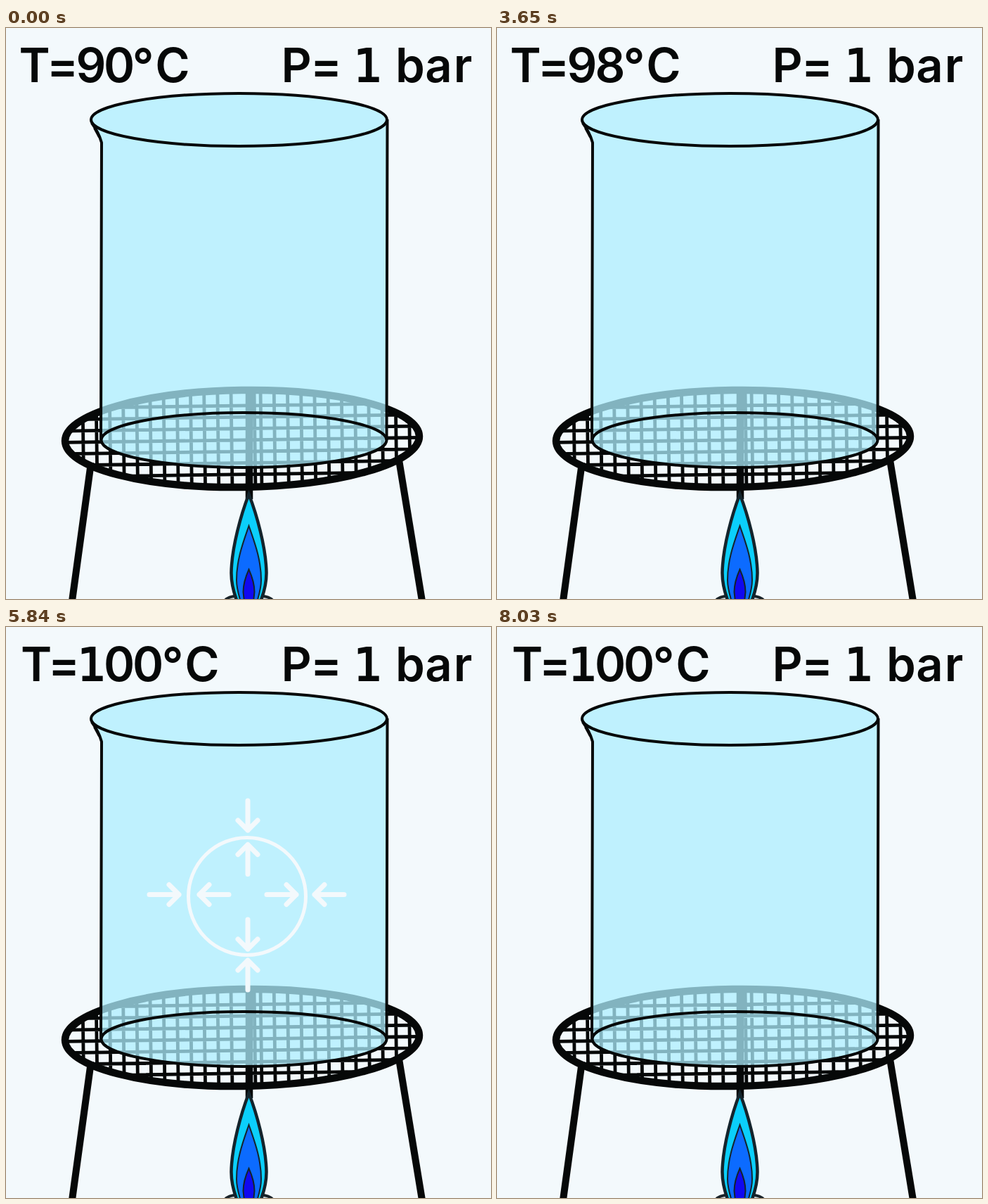
These frames come from a looping animation (690x812 px, 8.76 s). An HTML page:

```html
<!DOCTYPE html>
<html lang="en">
<head>
<meta charset="utf-8">
<title>Boiling water</title>
<style>
  html, body { margin: 0; width: 100%; height: 100%; overflow: hidden; background: #f3f9fc; }
  svg { display: block; width: 100vw; height: 100vh; }
  text { font: 600 67px Inter, sans-serif; text-anchor: middle; fill: #060808; }
  .one { font: 400 64px "DejaVu Sans", sans-serif; stroke: #060808; stroke-width: 2.2; }
  .ink { fill: none; stroke: #060808; }
  .bubble { fill: none; stroke: #f3f9fc; stroke-linecap: round; stroke-linejoin: round; }
</style>
</head>
<body>
<svg viewBox="0 0 690 812">
  <defs>
    <clipPath id="disc"><ellipse cx="336" cy="584" rx="252" ry="69"/></clipPath>
  </defs>

  <!-- tripod -->
  <path class="ink" stroke-width="10" d="M121 618L94 815M559 614L592 815"/>
  <g transform="rotate(-0.8 336 584)">
    <path id="mesh" class="ink" stroke-width="4.8" clip-path="url(#disc)"/>
    <ellipse class="ink" cx="336" cy="584" rx="252" ry="69" stroke-width="10.5"/>
  </g>
  <path class="ink" stroke-width="10.5" d="M346 515V670"/>

  <!-- burner and flame -->
  <ellipse cx="345.5" cy="815" rx="34" ry="9" fill="#c9d3d6" stroke="#182228" stroke-width="4"/>
  <g stroke="#14242c">
    <path fill="#0bcffb" stroke-width="4.5" d="M345.5 663C335 690 321 738 320.5 775C320.5 790 324 803 329 816H362C367 803 370.5 790 370.5 775C370 738 356 690 345.5 663Z"/>
    <path fill="#0c6bff" stroke-width="2" d="M345.5 708C338 730 328 755 328 785C328 797 331 806 334 816H357C360 806 363 797 363 785C363 755 353 730 345.5 708Z"/>
    <path fill="#1008f0" stroke-width="2" d="M345.5 770C341 780 337.5 790 337.5 802L339 816H352L353.5 802C353.5 790 350 780 345.5 770Z"/>
  </g>

  <!-- beaker -->
  <path fill="#adefff" fill-opacity=".74" d="M121 131A210.5 37.5 0 0 1 542.5 130L541.5 586A203 39 0 0 1 135.5 586L136 163Q130 147 121 131Z"/>
  <g class="ink" stroke-width="4">
    <ellipse cx="331.5" cy="130.5" rx="210.5" ry="37.5"/>
    <ellipse cx="338.5" cy="586" rx="203" ry="39"/>
    <path d="M122 135Q132 149 136 163L135 586M542.5 130L541.5 586"/>
    <path d="M126 142L133 155"/>
  </g>

  <g id="bubble" class="bubble"></g>
  <g id="temp"></g>
  <text y="76.5" x="413 455.5">P=</text>
  <text class="one" y="76" x="515">1</text>
  <text y="76.5" x="575 615.5 650">bar</text>
</svg>
<script>
const STEP = 730;
const $ = id => document.getElementById(id);

// wire gauze: wires spread both ways from the middle
let mesh = "M354 510V660";
for (let d = 21; d < 250; d += 19.2) mesh += `M${342 - d} 510V660M${342 + d} 510V660`;
for (let y = 537; y < 640; y += 16.3) mesh += `M80 ${y}H592`;
$("mesh").setAttribute("d", mesh);

// arrow with its tip at (x, y), pointing along the unit vector (dx, dy)
function arrow(x, y, dx, dy, len, head) {
  const bx = x - dx * head, by = y - dy * head;
  return `M${x - dx * len} ${y - dy * len}L${x} ${y}` +
    `M${bx - dy * head} ${by + dx * head}L${x} ${y}L${bx + dy * head} ${by - dx * head}`;
}

// tips: distances from the centre to the top, right, bottom and left arrow tips
function arrows(b, { tips, len, head, width }, sign) {
  const [t, r, d, l] = tips;
  const ax = b.cx + b.ox, ay = b.cy + b.oy;
  const path = arrow(ax, b.cy - t, 0, -sign, len, head) +
    arrow(b.cx + r, ay, sign, 0, len, head) +
    arrow(ax, b.cy + d, 0, sign, len, head) +
    arrow(b.cx - l, ay, -sign, 0, len, head);
  return `<path d="${path}" stroke-width="${width}"/>`;
}

const drawBubble = b => b
  ? `<circle cx="${b.cx}" cy="${b.cy}" r="${b.r}" stroke-width="${b.ring}"/>` +
    arrows(b, b.outer, -1) + arrows(b, b.inner, 1)
  : "";

const big = cy => ({
  cx: 343, cy, r: 83.5, ring: 5, ox: 1, oy: -2.5,
  outer: { tips: [94, 96, 91, 97], len: 42, head: 14, width: 7 },
  inner: { tips: [73.5, 70, 75, 68], len: 42, head: 14, width: 7 }
});
const medium = {
  cx: 339.5, cy: 420, r: 61, ring: 4, ox: 0.8, oy: 0,
  outer: { tips: [70, 72, 70, 69], len: 43, head: 14, width: 7 },
  inner: { tips: [54, 52, 54, 52.5], len: 30, head: 10, width: 5 }
};
const small = {
  cx: 339.5, cy: 318, r: 38.5, ring: 2.5, ox: 0.7, oy: 0.5,
  outer: { tips: [46, 45, 45, 46], len: 43, head: 14, width: 7 },
  inner: { tips: [32, 33, 31, 32], len: 32, head: 9.5, width: 5 }
};

function drawTemp(t) {
  if (t < 100) return `<text y="76.5" x="40.5 80.5 121 161 195 237">T=${t}°C</text>`;
  return `<text y="76.5" x="43 82.5">T=</text><text class="one" y="76" x="122">1</text>` +
    `<text y="76.5" x="161 202 237 279">00°C</text>`;
}

// temperature, bubble
const steps = [
  [90], [90, big(479)], [92, medium], [94, small], [96], [98],
  [100, big(501.5)], [100, big(445.5)], [100, big(383)],
  [100, big(310.5)], [100, big(179.5)], [100]
];

let shown = -1;
const start = performance.now();
function tick(now) {
  const i = Math.floor(Math.max(0, now - start) / STEP) % steps.length;
  if (i !== shown) {
    const [temp, bubble] = steps[i];
    $("temp").innerHTML = drawTemp(temp);
    $("bubble").innerHTML = drawBubble(bubble);
    shown = i;
  }
  requestAnimationFrame(tick);
}
tick(start);
</script>
</body>
</html>
```
